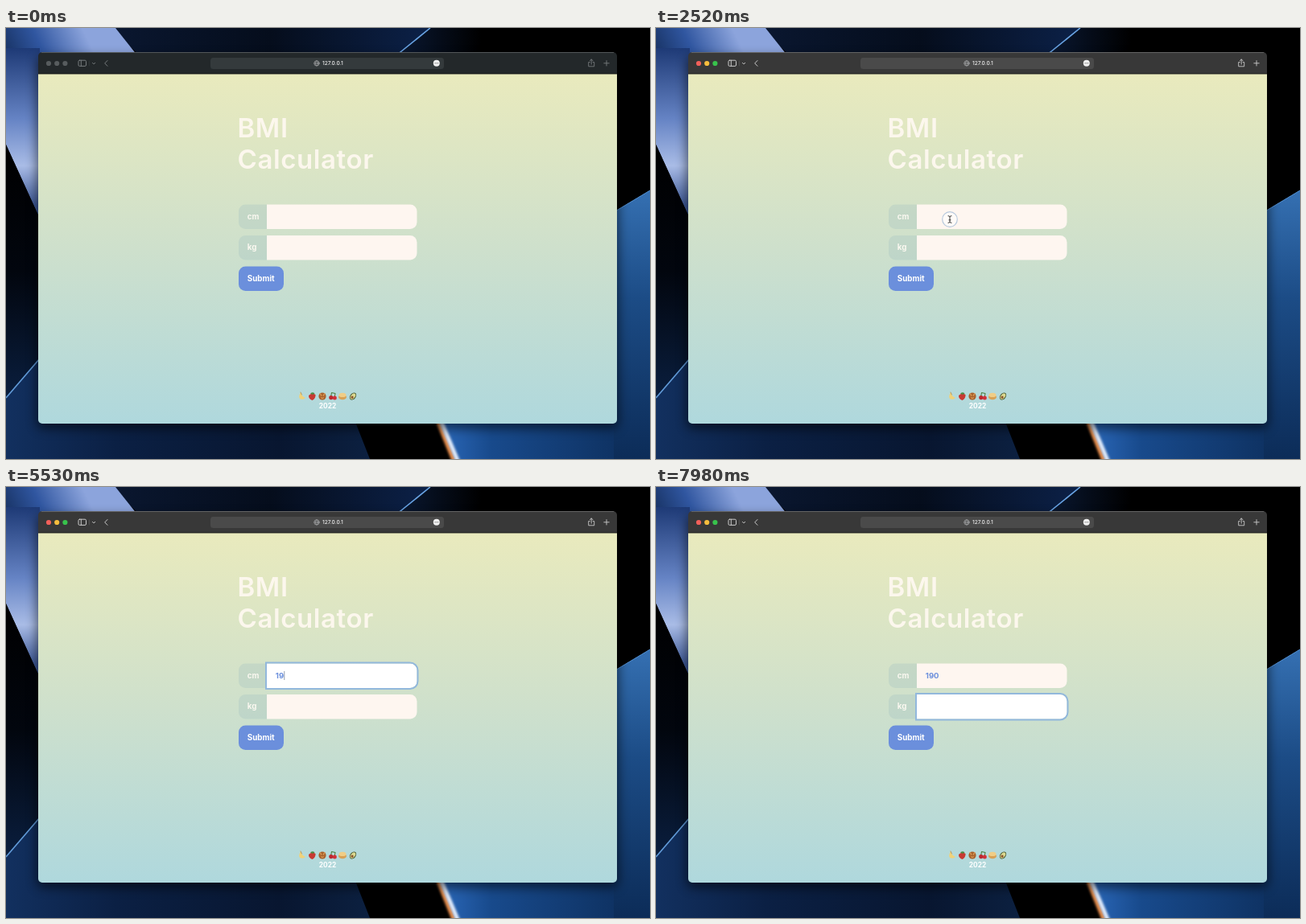
Write an HTML page that moves like this. It is 800 by 536 pixels and loops after 8 s.

```html
<!DOCTYPE html>
<html lang="en">
<head>
<meta charset="utf-8">
<title>BMI Calculator</title>
<style>
html, body { margin: 0; width: 100%; height: 100%; overflow: hidden; background: #000; }
svg { display: block; width: 800px; height: 536px; }
text { font-family: Inter, Roboto, sans-serif; font-weight: 700; font-size: 9.8px; }
.title { font-size: 33px; font-weight: 600; letter-spacing: .6px; fill: #fcf7ed; }
.line { fill: none; stroke-linecap: round; stroke-linejoin: round; }
.value { fill: #6b8fdc; font-size: 9.5px; }
#icons { stroke: currentColor; }
</style>
</head>
<body>
<svg viewBox="0 0 800 536">
  <defs>
    <linearGradient id="page" x2="0" y2="1">
      <stop stop-color="#e9eabd"/><stop offset=".5" stop-color="#cee0cc"/><stop offset="1" stop-color="#afd8dd"/>
    </linearGradient>
    <linearGradient id="beam" gradientUnits="userSpaceOnUse" x1="0" y1="40" x2="93" y2="-4">
      <stop stop-color="#16305f"/><stop offset=".45" stop-color="#3056a0"/><stop offset="1" stop-color="#8ca4dc"/>
    </linearGradient>
    <linearGradient id="beamLow" gradientUnits="userSpaceOnUse" x1="0" y1="25" x2="0" y2="220">
      <stop stop-color="#1e3a76"/><stop offset=".45" stop-color="#6583c4"/><stop offset=".75" stop-color="#a9bce6"/><stop offset="1" stop-color="#3f5b9a"/>
    </linearGradient>
    <linearGradient id="topDark" x2="1">
      <stop stop-color="#0a1730"/><stop offset=".5" stop-color="#050d1c"/><stop offset="1" stop-color="#0c2148"/>
    </linearGradient>
    <linearGradient id="topRight" x2="1">
      <stop stop-color="#0b1a36"/><stop offset=".5" stop-color="#000"/>
    </linearGradient>
    <linearGradient id="leftDark" x2="0" y2="1">
      <stop stop-color="#000"/><stop offset=".5" stop-color="#02060e"/><stop offset="1" stop-color="#0a1e3e"/>
    </linearGradient>
    <linearGradient id="bottomLeft" x2="1">
      <stop stop-color="#12305f"/><stop offset=".3" stop-color="#0b2044"/><stop offset=".75" stop-color="#081630"/><stop offset="1" stop-color="#0c2040"/>
    </linearGradient>
    <linearGradient id="bottomRight" x2="1">
      <stop stop-color="#2c6abc"/><stop offset=".25" stop-color="#184a8c"/><stop offset="1" stop-color="#0c2c58"/>
    </linearGradient>
    <linearGradient id="rightBlue" x2="0" y2="1">
      <stop stop-color="#3570b2"/><stop offset=".4" stop-color="#1c4c86"/><stop offset="1" stop-color="#0c2c58"/>
    </linearGradient>
    <filter id="soft" x="-10%" y="-10%" width="120%" height="120%"><feGaussianBlur stdDeviation="7"/></filter>
    <filter id="glow" x="-100%" width="300%"><feGaussianBlur stdDeviation="1.5"/></filter>
  </defs>

  <g id="wallpaper">
    <rect width="800" height="536"/>
    <path d="M130 0H527L480 38H170Z" fill="url(#topDark)"/>
    <path d="M527 0H700V38H480Z" fill="url(#topRight)"/>
    <path d="M527 0L480 38" stroke="#69a4e4" stroke-width="1.6"/>
    <path d="M0 0H136L163 34H0Z" fill="url(#beam)"/>
    <path d="M0 25H42V237L0 145Z" fill="url(#beamLow)"/>
    <path d="M0 145L42 237V415L0 460Z" fill="url(#leftDark)"/>
    <path d="M0 460L42 411V490H434L452 536H0Z" fill="url(#bottomLeft)"/>
    <path d="M0 460L42 411" stroke="#629cd9" stroke-width="1.6"/>
    <path d="M536 488H800V536H557Z" fill="url(#bottomRight)"/>
    <path d="M536 488L557 540" stroke="#e48a48" stroke-width="5" filter="url(#glow)"/>
    <path d="M540 488L562 540" stroke="#e3edfc" stroke-width="5" filter="url(#glow)"/>
    <path d="M755 229L800 202V536H755Z" fill="url(#rightBlue)"/>
    <path d="M755 229L800 202" stroke="#5290d2"/>
  </g>

  <rect x="38" y="36" width="723" height="462" rx="8" opacity=".55" filter="url(#soft)"/>
  <rect id="bar" x="40" y="30" width="719" height="60" rx="5"/>
  <path d="M44 30.5H755" stroke="#fff" stroke-opacity=".22"/>
  <path d="M40 57H759V487a5 5 0 0 1-5 5H45a5 5 0 0 1-5-5Z" fill="url(#page)"/>
  <path d="M40 57H759" stroke="#111" stroke-width=".8"/>
  <rect id="address" x="254" y="37" width="290" height="14" rx="3.5"/>
  <g id="lights"><circle cx="53" cy="44" r="3.1"/><circle cx="63.2" cy="44" r="3.1"/><circle cx="73.4" cy="44" r="3.1"/></g>
  <g id="icons" class="line">
    <rect x="90" y="40.2" width="9.5" height="7.2" rx="1.4"/><path d="M93.3 40.2V47.4M107.5 43.3l1.6 1.6 1.6-1.6M126 40.5l-3.3 3.4 3.3 3.4"/>
    <path d="M725.2 42.5h-1.5v5.3h7v-5.3h-1.5M727.2 45.2V39M725.4 40.7l1.8-1.8 1.8 1.8M742.8 43.8h6.4M746 40.6V47" stroke-width=".9"/>
    <path d="M103.5 41v6" opacity=".25" stroke-width=".6"/>
  </g>
  <g class="line" stroke="#a9abac" stroke-width=".7"><circle cx="386" cy="43.9" r="3.2"/><ellipse cx="386" cy="43.9" rx="1.4" ry="3.2"/><path d="M382.8 43.9h6.4"/></g>
  <text x="393" y="46.4" fill="#eee" style="font-size:6.6px;font-weight:500">127.0.0.1</text>
  <circle cx="534.8" cy="43.8" r="4" fill="#f0f0f0"/>
  <path d="M533 43.8h0M534.8 43.8h0M536.6 43.8h0" class="line" stroke="#444" stroke-width="1.1"/>

  <text class="title" x="287.5" y="136">BMI</text>
  <text class="title" x="287.5" y="175">Calculator</text>
  <g id="form"></g>
  <rect x="289" y="296.5" width="56" height="30.5" rx="8.5" fill="#6b8fdc"/>
  <text x="299.8" y="315" fill="#fff">Submit</text>

  <g id="treats">
    <path d="M366 453q1 5 6 7-3 3-7 1-2-3 1-8" fill="#efd27b"/><path d="M366 453l1.4 3" class="line" stroke="#b68a43" stroke-width=".8"/>
    <path d="M376 457q4-4 8.5-1 .5 4.500-4 7-5-2-4.500-6" fill="#c73a32"/><path d="M378 454.600q3-2.500 5.500 0l-2.700 1.500Z" fill="#4c8a42"/>
    <circle cx="393" cy="458" r="4.6" fill="#a9602b"/><path d="M389.500 454.500l2 1.500M396.500 454.500l-2 1.500M391 457h1M394 457h1M391.500 460q1.500 1 3 0" class="line" stroke="#ecb269" stroke-width="1"/>
    <path d="M403.500 459l1-5.500 4.500 1-1 5" class="line" stroke="#4d8140" stroke-width="1.1"/><circle cx="403.8" cy="459.600" r="2.600" fill="#bd2930"/><circle cx="408.300" cy="460" r="2.500" fill="#cf3239"/>
    <ellipse cx="418" cy="459" rx="5" ry="3.300" fill="#d8a256"/><ellipse cx="418" cy="456.400" rx="4.500" ry="2.600" fill="#f0cd86"/>
    <g transform="rotate(38 431 458)"><ellipse cx="431" cy="458" rx="3.500" ry="5.100" fill="#455832"/><ellipse cx="431" cy="458" rx="2.600" ry="4.200" fill="#dbd890"/><circle cx="431" cy="459.500" r="1.600" fill="#8a5730"/></g>
  </g>
  <text x="399.5" y="472.500" text-anchor="middle" fill="#fff" style="font-size:8.300px">2022</text>

  <g id="tabKey">
    <rect x="376" y="451" width="49" height="37.500" rx="7.500" fill="#3b4443"/>
    <path d="M391 469.800H405M400.500 465.300l4.700 4.500-4.700 4.500M409 464.500v10.600" class="line" stroke="#fff" stroke-width="2"/>
  </g>

  <g id="cursor">
    <circle id="click" r="9.300" fill="#fff" fill-opacity=".5" stroke="#b7c9dd" stroke-width="1.200"/>
    <path id="beamCursor" d="M-2-4.300Q0-4.300 0-3.300Q0-4.300 2-4.300M0-3.300V3.300M-2 4.300Q0 4.300 0 3.300Q0 4.300 2 4.300M-1 .8H1" class="line" stroke="#222" stroke-width=".9"/>
    <path id="arrow" d="M0 0V7.800L1.800 6.200 3 9 4.300 8.400 3.100 5.700H5.600Z" stroke="#fff" stroke-width=".5"/>
  </g>
</svg>
<script>
const LOOP = 8000, STEP = 70;
const ACTIVATE = 2450, FOCUS_CM = 3990, TAB = 6370;
const $ = id => document.getElementById(id);
const clamp = x => Math.max(0, Math.min(1, x));
const ramp = (t, from, to) => clamp((t - from) / (to - from));
const within = (t, spans) => spans.some(([a, b]) => t >= a && t < b);
const set = (el, attrs) => { for (const key in attrs) el.setAttribute(key, attrs[key]); };

const fieldPath = (x, y, w, h, r) =>
  `M${x} ${y}h${w - r}a${r} ${r} 0 0 1 ${r} ${r}v${h - 2 * r}a${r} ${r} 0 0 1 ${-r} ${r}h${r - w}Z`;

function addField(id, y) {
  $('form').insertAdjacentHTML('beforeend', `
    <path d="M324 ${y}H297.5a8.500 8.500 0 0 0-8.500 8.500v13.500a8.500 8.500 0 0 0 8.500 8.500H324Z" fill="#9bbabd" fill-opacity=".28"/>
    <text x="299.800" y="${y + 18.200}" fill="#faf8f0">${id}</text>
    <path id="${id}Box" d="${fieldPath(324, y, 186.500, 30.500, 8.500)}"/>
    <path id="${id}Ring" d="${fieldPath(323, y - 1, 188.500, 32.500, 9.500)}" fill="none" stroke="#92b8dc" stroke-width="2"/>
    <text id="${id}Value" class="value" x="334.800" y="${y + 18.200}"></text>
    <path id="${id}Caret" d="M0 ${y + 9.500}v11" stroke="#8592a8" stroke-width=".9"/>`);
}
addField('cm', 219.5);
addField('kg', 258);

const caretOn = {
  cm: [[FOCUS_CM, 4550], [4970, 6160]],
  kg: [[TAB, 6930], [7350, 7910]]
};
const keys = [[5110, '1'], [5320, '9'], [5600, '0']];

// time, x, y
const path = [
  [770, 815, 303], [980, 614, 298], [1120, 471, 297], [1260, 407, 294], [1400, 423, 262],
  [1820, 423, 262], [2380, 365, 238], [2800, 365, 238], [3360, 377, 238],
  [4060, 377, 238], [4200, 425, 244], [4620, 742, 286], [4830, 815, 296]
];

function pointerAt(t) {
  const i = path.findIndex(p => p[0] > t);
  if (i < 1) return null;
  const [a, b] = [path[i - 1], path[i]];
  const k = ramp(t, a[0], b[0]);
  const ease = k * k * (3 - 2 * k);
  return [1, 2].map(n => a[n] + (b[n] - a[n]) * ease);
}

function drawField(id, value, focused, ring, t) {
  $(id + 'Box').setAttribute('fill', focused ? '#fff' : '#fef6f0');
  $(id + 'Ring').setAttribute('opacity', ring);
  const text = $(id + 'Value');
  text.textContent = value;
  const x = 335 + (value ? text.getComputedTextLength() + .5 : 0);
  set($(id + 'Caret'), { transform: `translate(${x} 0)`, opacity: within(t, caretOn[id]) ? 1 : 0 });
}

function drawPointer(t, active) {
  const at = pointerAt(t);
  $('cursor').setAttribute('visibility', at ? 'visible' : 'hidden');
  if (!at) return;
  const [x, y] = at;
  const overField = active && x > 324 && x < 510 && y > 219 && y < 289;
  const pressed = [ACTIVATE, FOCUS_CM].find(c => t >= c && t < c + 350);
  $('cursor').setAttribute('transform', `translate(${x} ${y})`);
  $('beamCursor').setAttribute('opacity', overField ? 1 : 0);
  $('arrow').setAttribute('opacity', overField ? 0 : 1);
  $('click').setAttribute('opacity', pressed ? 1 - ramp(t, pressed + 140, pressed + 350) : 0);
}

function draw(t) {
  const active = t >= ACTIVATE;
  $('bar').setAttribute('fill', active ? '#383838' : '#23282a');
  $('address').setAttribute('fill', active ? '#4a4a4a' : '#343a3c');
  $('icons').style.color = active ? '#c9c9c9' : '#767b7d';
  ['#f2605a', '#f5bd3d', '#38c24c'].forEach((color, i) =>
    $('lights').children[i].setAttribute('fill', active ? color : '#575c5e'));

  const typed = keys.filter(k => t >= k[0]).map(k => k[1]).join('');
  const leave = ramp(t, TAB, TAB + 210);
  drawField('cm', typed, t >= FOCUS_CM && t < TAB, ramp(t, FOCUS_CM, FOCUS_CM + 210) * (1 - leave), t);
  drawField('kg', '', t >= TAB, leave, t);
  $('tabKey').setAttribute('opacity', t < 6300 ? 0 : 1 - ramp(t, 7350, 7840));
  drawPointer(t, active);
}

const start = performance.now();
function tick() {
  const t = (performance.now() - start) % LOOP;
  draw(Math.floor(t / STEP) * STEP);
  requestAnimationFrame(tick);
}
tick();
</script>
</body>
</html>
```
